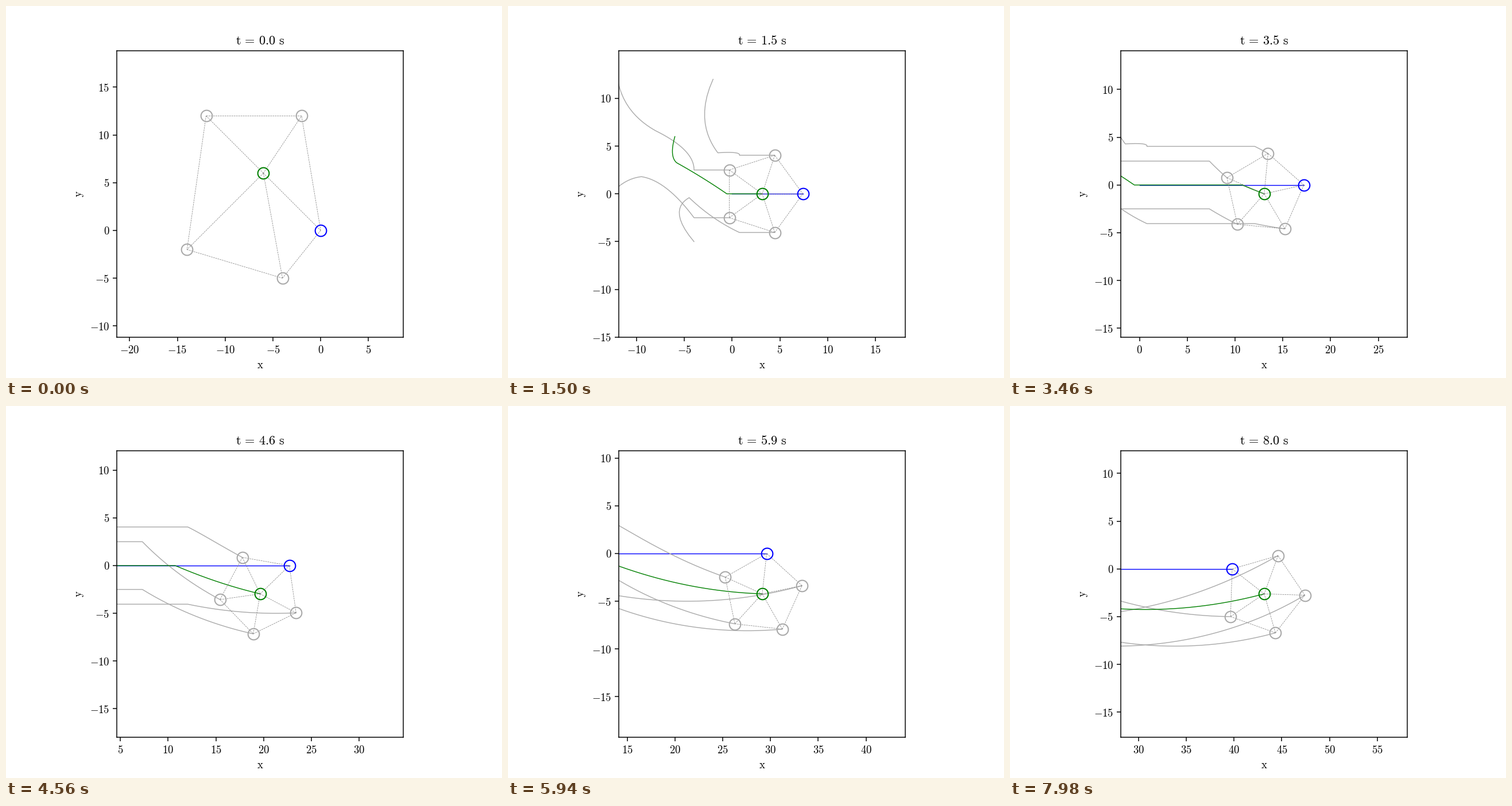
A matplotlib script for the animation above (8 s loop, 864 by 648 pixels).

```python
import numpy as np
import matplotlib.pyplot as plt
from matplotlib.animation import FuncAnimation
from matplotlib.ticker import FuncFormatter, MultipleLocator

plt.rcParams["mathtext.fontset"] = "cm"

FRAMES, STEP_MS = 400, 20
DT = STEP_MS / 1000
SPEED, SPIN = 5.0, 0.5                # leader speed, formation turn rate (rad/s)
KNEE, LOCKED, TURNING = 14, 38, 151   # steps that end the dash, the gathering, the glide
RADIUS = 5 / (2 * np.sin(np.pi / 5))  # pentagon with sides of length 5
HALF_VIEW = 15

# Gathering path of each follower: start, handle, knee, handle
PATHS = np.array([
    [(-2, 12), (-4, 7.6), (-1.5, 4.3), (0.9, 4.45)],
    [(-12, 12), (-11.4, 8.5), (-8, 6.6), (-3.95, 4.6)],
    [(-14, -2), (-12.2, 1.5), (-9.5, 1.8), (-6.9, 1.4)],
    [(-4, -5), (-6.8, -1.7), (-4.5, -0.4), (-2.1, -2.7)],
    [(-6, 6), (-6.6, 3.9), (-5.8, 3.25), (-3.1, 1.75)],
])


def bezier(a, b, c, u):
    return (1 - u) ** 2 * a + 2 * u * (1 - u) * b + u ** 2 * c


def gather(path, end, n):
    """Quick dash to the knee, then a steady run to the place in the formation."""
    start, bend, knee, turn = path
    dash = 1 - (1 - np.clip(n / KNEE, 0, 1)) ** 1.5
    run = (n - KNEE) / (LOCKED - KNEE)
    return np.where(n < KNEE, bezier(start, bend, knee, dash),
                    bezier(knee, turn, end, run))


def simulate():
    """Positions with shape (step, agent, xy): leader, four followers, hub."""
    n = np.arange(FRAMES)
    turn = SPIN * DT * np.maximum(n - TURNING, 0)

    def ray(angle):
        return RADIUS * np.stack([np.cos(angle), np.sin(angle)], axis=1)

    pos = np.zeros((FRAMES, 6, 2))
    pos[:, 0, 0] = SPEED * DT * np.maximum(n - 1, 0)
    pos[:, 5] = pos[:, 0] - ray(turn)
    for k in range(1, 5):
        pos[:, k] = pos[:, 5] + ray(turn + 2 * np.pi * k / 5)
    for k, path in enumerate(PATHS, start=1):
        pos[:LOCKED, k] = gather(path, pos[LOCKED, k], n[:LOCKED, None])
    return pos


POS = simulate()
COLORS = ["blue"] + ["darkgray"] * 4 + ["green"]
EDGES = [(k, (k + 1) % 5) for k in range(5)] + [(5, k) for k in range(5)]

fig, ax = plt.subplots(figsize=(6.4, 4.8), dpi=135)
ax.set_aspect("equal")
ax.set_xlabel(r"$\mathrm{x}$")
ax.set_ylabel(r"$\mathrm{y}$")
title = ax.set_title("", fontsize=11.9)
for axis in (ax.xaxis, ax.yaxis):
    axis.set_major_locator(MultipleLocator(5))
    axis.set_major_formatter(
        FuncFormatter(lambda v, _: r"$\mathrm{%d}$" % int(round(v))))

trails = [ax.plot([], [], color=c, lw=0.75, zorder=2)[0] for c in COLORS]
links, = ax.plot([], [], "--", color="gray", lw=0.4, zorder=3)
rings = [ax.plot([], [], "o", ms=10.5, mew=1.1, mfc="none", mec=c, zorder=4)[0]
         for c in COLORS]


def update(n):
    now = POS[n]
    for k in range(6):
        trails[k].set_data(POS[:n + 1, k, 0], POS[:n + 1, k, 1])
        rings[k].set_data([now[k, 0]], [now[k, 1]])
    gap = [np.nan, np.nan]
    path = np.array([p for a, b in EDGES for p in (now[a], now[b], gap)])
    links.set_data(path[:, 0], path[:, 1])

    # The tiny drop keeps a tick off the top border during the level glide
    cx, cy = now.mean(axis=0) - (0, 1e-3)
    ax.set_xlim(cx - HALF_VIEW, cx + HALF_VIEW)
    ax.set_ylim(cy - HALF_VIEW, cy + HALF_VIEW)
    title.set_text(r"$\mathrm{t\,=\,%.1f\ s}$" % (n * DT))
    return [*trails, links, *rings, title]


anim = FuncAnimation(fig, update, frames=FRAMES, interval=STEP_MS,
                     repeat=True, repeat_delay=0, blit=False)
plt.show()
```
